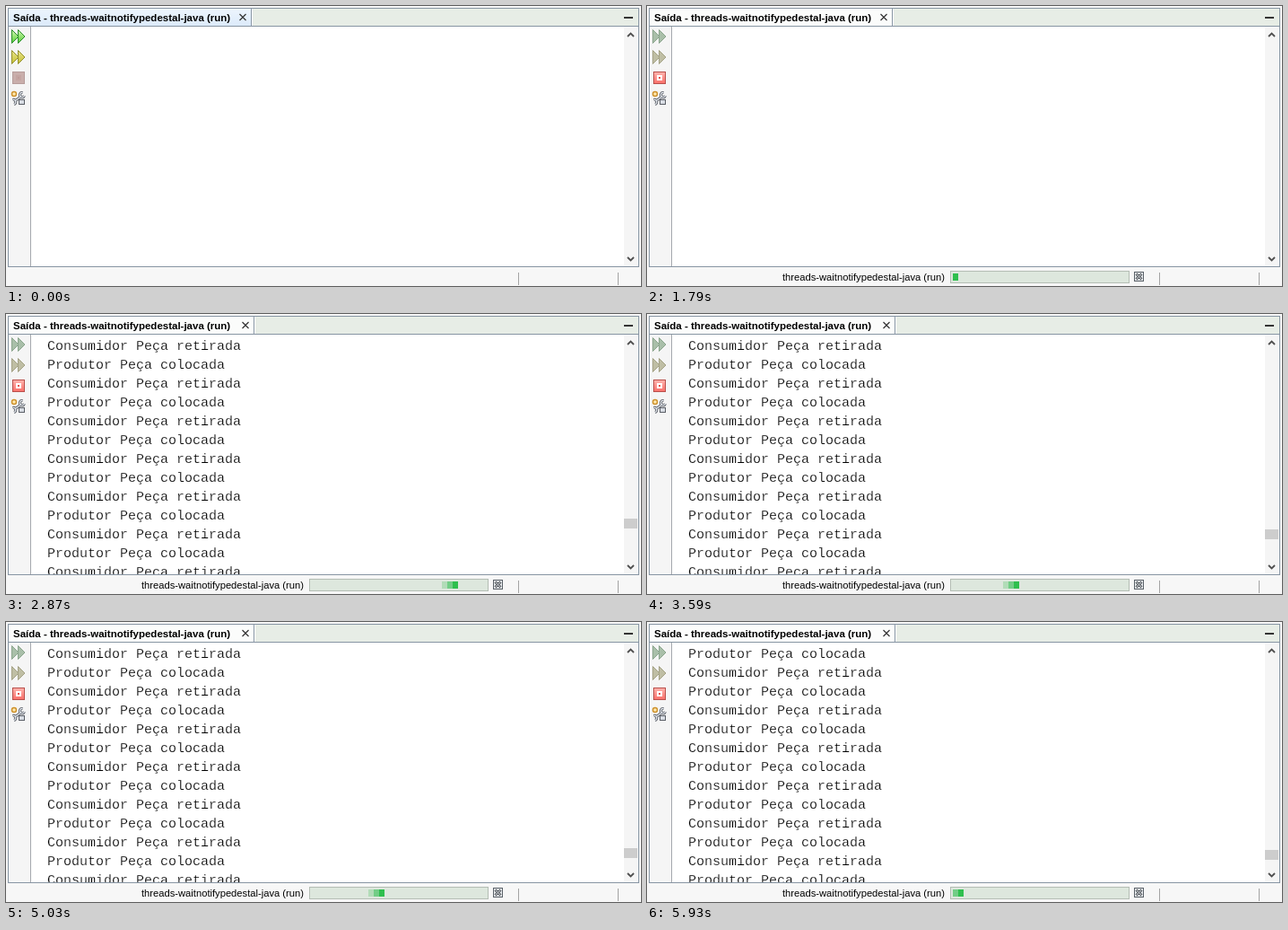
Write an HTML page that moves like this. It is 708 by 312 pixels and loops after 5990 ms.

```html
<!DOCTYPE html>
<html lang="pt">
<head>
<meta charset="utf-8">
<title>Saída</title>
<style>
  html, body { margin: 0; width: 100%; height: 100%; overflow: hidden; background: #f7f7f7; }
  svg { display: block; width: 708px; height: 312px; }
  rect { shape-rendering: crispEdges; }
  text { fill: #000; white-space: pre; }
  .title { font: bold 11.5px "Liberation Sans", Arial, sans-serif; }
  .status { font: 11.2px "Liberation Sans", Arial, sans-serif; }
  .console { font: 15px "Liberation Mono", "Courier New", monospace; stroke: #fff; stroke-width: .25; }
  .run { fill: url(#green); stroke: #2c8f2c; }
  .again { fill: url(#olive); stroke: #95912c; }
  .stop { fill: #c9aeab; stroke: #b79d9b; }
  .hole { fill: #bf9d9a; stroke: #c4a5a2; stroke-width: 2; }
  .busy .run { fill: #a9bfa9; stroke: #8ca68e; }
  .busy .again { fill: #bfbea4; stroke: #a5a386; }
  .busy .stop { fill: url(#red); stroke: #b9504c; }
  .busy .hole { fill: #e4544e; stroke: #fff; }
  .task { visibility: hidden; }
  .busy .task { visibility: visible; }
</style>
</head>
<body>
<svg id="stage" viewBox="0 0 708 312">
  <defs>
    <linearGradient id="green" x2="0" y2="1"><stop stop-color="#d2f7b4"/><stop offset="1" stop-color="#55cf35"/></linearGradient>
    <linearGradient id="olive" x2="0" y2="1"><stop stop-color="#e9e58c"/><stop offset="1" stop-color="#c6bf35"/></linearGradient>
    <linearGradient id="red" x2="0" y2="1"><stop stop-color="#ffb4ae"/><stop offset="1" stop-color="#f96f69"/></linearGradient>
    <linearGradient id="blue" x2="0" y2="1"><stop stop-color="#edf5fd"/><stop offset="1" stop-color="#dceafa"/></linearGradient>
    <clipPath id="page"><rect x="28" y="23" width="661" height="267"/></clipPath>
    <clipPath id="groove"><rect x="341" y="298" width="194" height="8"/></clipPath>
    <path id="wrench" d="M18.5 96.500a2.600 2.600 0 1 0 2 3.500M16 101.500l-5.500 4M7.500 104.500a2.600 2.600 0 1 1 1.500 5"/>
  </defs>

  <rect width="708" height="312" fill="#f7f7f7"/>

  <!-- tab row -->
  <rect x="3" y="3" width="702" height="19" fill="#e7ede6"/>
  <rect id="tab" x="3" y="3" height="19"/>
  <text class="title" x="8" y="17">Saída - threads-waitnotifypedestal-java (run)</text>
  <g id="tabEnd">
    <path d="M260.5 9l7 7m0-7l-7 7" stroke="#333" stroke-width="1.2"/>
    <rect x="273" y="3" width="1" height="19" fill="#8795a3"/>
    <rect x="274" y="3" width="1" height="19" fill="#fff"/>
  </g>
  <rect x="689" y="12" width="10" height="2" fill="#333"/>

  <!-- panel -->
  <rect x="3" y="23" width="24" height="267" fill="#f5f5f5"/>
  <rect x="28" y="23" width="661" height="267" fill="#fff"/>
  <rect x="689" y="23" width="16" height="267" fill="#f5f5f5"/>
  <rect x="27" y="23" width="1" height="267" fill="#a5a9ae"/>
  <rect x="3" y="22" width="702" height="1" fill="#8795a3"/>
  <rect x="2.5" y="2.5" width="703" height="288" fill="none" stroke="#8795a3"/>

  <!-- scrollbar -->
  <path d="M693 34l3.5-3.5l3.5 3.5M693 280l3.5 3.5l3.5-3.5" fill="none" stroke="#505050" stroke-width="1.8"/>
  <rect id="thumb" x="689" width="15" height="11" fill="#cdcdcd"/>

  <!-- tool buttons -->
  <path class="run" d="M6.5 26.500v15l7.500-7.500zM13.5 26.500v15l7.500-7.500z"/>
  <path class="again" d="M6.5 49.500v15l7.500-7.500zM13.5 49.500v15l7.500-7.500z"/>
  <rect class="stop" x="7.500" y="73.500" width="13" height="13"/>
  <rect class="hole" x="12" y="78" width="4" height="4"/>
  <g fill="none">
    <use href="#wrench" stroke="#5a5e66" stroke-width="3"/>
    <use href="#wrench" stroke="#e4e8ee" stroke-width="1.2"/>
    <rect x="14.500" y="104.500" width="6" height="5" fill="#d9dde4" stroke="#5a5e66"/>
    <circle cx="9" cy="98" r="2.500" fill="#ffe9b0" stroke="#cf9430" stroke-width="1.500"/>
  </g>

  <g id="lines" class="console" clip-path="url(#page)"></g>

  <!-- status bar -->
  <rect x="571" y="297" width="1" height="14" fill="#a3a3a3"/>
  <rect x="682" y="297" width="1" height="14" fill="#a3a3a3"/>
  <g class="task">
    <text class="status" x="151" y="306">threads-waitnotifypedestal-java (run)</text>
    <rect x="338.500" y="295.500" width="199" height="13" fill="#dde7dd" stroke="#b4bdb4"/>
    <g clip-path="url(#groove)">
      <g id="chunk">
        <rect x="-12" y="298" width="6" height="8" fill="#b2dcb8"/>
        <rect x="-6" y="298" width="6" height="8" fill="#72cd86"/>
        <rect y="298" width="6" height="8" fill="#2fbf4e"/>
      </g>
    </g>
    <rect x="543.500" y="296.500" width="10" height="10" fill="#e6e9ec" stroke="#5a6168"/>
    <path d="M545.5 298.500l6 6m0-6l-6 6" stroke="#4a4f55" stroke-width="2.6"/>
    <path d="M545.5 298.500l6 6m0-6l-6 6" stroke="#e6e9ec"/>
  </g>
</svg>
<script>
const LOOP = 5990, BLUR = 460, START = 1790, TICK = 60, FIRST_OUTPUT = 2;
const ROWS = 13, ROW_HEIGHT = 21, BASELINE = 40;
const PHRASES = ["Consumidor Peça retirada", "Produtor Peça colocada"];

// [tick, value] points joined by straight lines
const SWEEP = [[0, 0], [18, 23], [30, 40], [42, 55], [54, 71], [69, 91]];
const SCROLL = [[2, 130], [6, 200], [18, 228], [30, 240], [42, 251], [54, 252], [69, 254]];

const $ = id => document.getElementById(id);
const set = (id, name, value) => $(id).setAttribute(name, value);

function along(points, k) {
  let i = 1;
  while (i < points.length - 1 && k > points[i][0]) i++;
  const [k0, v0] = points[i - 1], [k1, v1] = points[i];
  return v0 + (v1 - v0) * (k - k0) / (k1 - k0);
}

const rows = Array.from({ length: ROWS }, (_, i) => {
  const row = document.createElementNS("http://www.w3.org/2000/svg", "text");
  row.setAttribute("x", 46);
  row.setAttribute("y", BASELINE + i * ROW_HEIGHT);
  $("lines").append(row);
  return row;
});

function draw(t) {
  const busy = t >= START;
  const tick = busy ? Math.floor((t - START) / TICK) : 0;
  const printing = tick >= FIRST_OUTPUT;
  const shift = printing ? 3 : 0;

  $("stage").classList.toggle("busy", busy);
  set("tab", "fill", t < BLUR ? "url(#blue)" : "#fbfcfb");
  set("tab", "width", 270 + shift);
  set("tabEnd", "transform", `translate(${shift} 0)`);

  // thirty steps per pass, then back to the left edge
  const step = Math.floor(along(SWEEP, tick) + 1e-6) % 30;
  set("chunk", "transform", `translate(${341 + Math.floor(step * 206 / 30)} 0)`);

  set("lines", "visibility", printing ? "visible" : "hidden");
  set("thumb", "visibility", printing ? "visible" : "hidden");
  if (printing) {
    set("thumb", "y", Math.round(along(SCROLL, tick)));
    rows.forEach((row, i) => { row.textContent = PHRASES[(i + tick) % 2]; });
  }
}

const origin = performance.now();
function loop() {
  draw((performance.now() - origin) % LOOP);
  requestAnimationFrame(loop);
}
loop();
</script>
</body>
</html>
```
